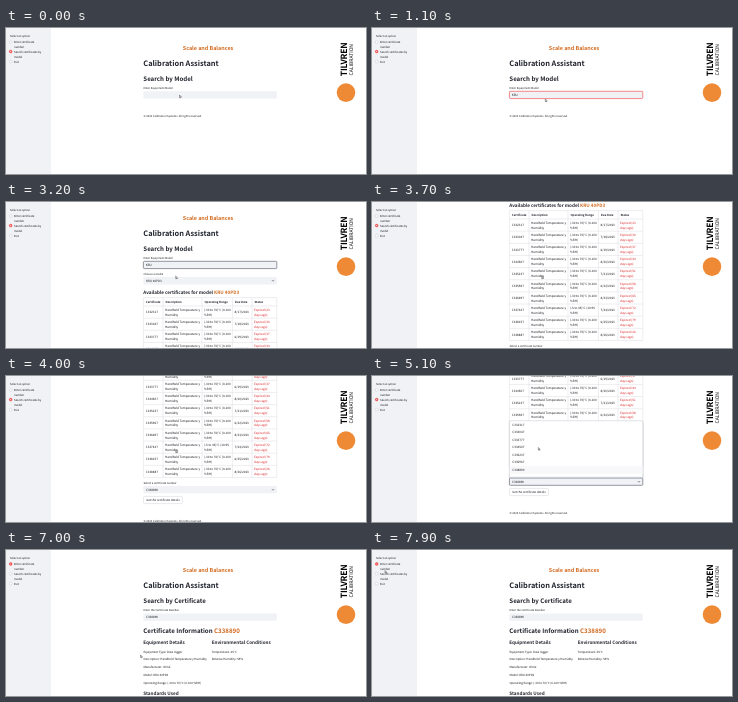
Recreate the animation shown at these times as an HTML page. Size 360 px wide and 146 px high, loop 8 s.

```html
<!DOCTYPE html>
<html lang="en">
<head>
<meta charset="utf-8">
<title>Calibration Assistant</title>
<style>
html, body { margin: 0; width: 100%; height: 100%; overflow: hidden; background: #fff; }
svg { display: block; width: 360px; height: 146px; }
text { font-family: "Noto Sans CJK JP", "Noto Sans CJK SC", "Noto Sans", sans-serif; fill: #14151b; text-rendering: geometricPrecision; white-space: pre; }
text[font-weight] { fill: #22242e; }
</style>
</head>
<body>
<svg id="stage" viewBox="0 0 360 146" xmlns="http://www.w3.org/2000/svg"></svg>
<script>
const LOOP = 8000, STEP = 100;
const H1 = 7.42, H2 = 6.15, H3 = 4.58, BODY = 3.04, SMALL = 2.68;
const ORANGE = '#d2691e', RED = '#f03c3c', GREY = '#f0f2f6', LINE = '#d8dae0', INK = '#14151b';
const MODEL = 'KRU 40PD3', CERT = 'C338890';
const FOOTER = '© 2023 Calibration Systems. All rights reserved.';

// Text placed by the middle of its capitals.
const text = (x, mid, str, size = BODY, attrs = '') =>
  `<text x="${x}" y="${(mid + size * 0.37).toFixed(2)}" font-size="${size}" ${attrs}>${str}</text>`;
const bold = (x, mid, str, size, attrs = '') => text(x, mid, str, size, `font-weight="700" ${attrs}`);
const box = (x, y, w, h, fill, attrs = '') =>
  `<rect x="${x}" y="${y}" width="${w}" height="${h}" fill="${fill}" ${attrs}/>`;
const line = (x1, y1, x2, y2) =>
  `<path d="M${x1} ${y1}L${x2} ${y2}" stroke="${LINE}" stroke-width=".45"/>`;
const group = (id, body) => `<g id="${id}">${body}</g>`;
const accent = str => `<tspan fill="${ORANGE}">${str}</tspan>`;
const field = (id, y) => box(137.4, y, 133.4, 7.3, GREY, `id="${id}" rx="1" stroke-width=".6"`);
const chevron = y => `<path d="M266 ${y - 0.5}l1 1 1-1" fill="none" stroke="${INK}" stroke-width=".5"/>`;

function header(title, label) {
  return bold(202, 19.9, 'Scale and Balances', 5.4, `text-anchor="middle" style="fill:${ORANGE}"`) +
    bold(137.3, 35.6, 'Calibration Assistant', H1) +
    bold(137.3, 50.6, title, H2) +
    text(137.4, 60, label, SMALL);
}

function table() {
  const top = 99.6, first = 108, pitch = 12.15, rows = 10, end = first + rows * pitch;
  const cols = [137.4, 157, 196, 226.4, 246, 270.8];
  const heads = ['Certificate', 'Description', 'Operating Range', 'Due Date', 'Status'];
  let out = cols.map(x => line(x, top, x, end)).join('') + line(137.4, top, 270.8, top);
  heads.forEach((h, i) => out += bold(cols[i] + 2.4, 104, h, 2.85));
  for (let i = 0; i < rows; i++) {
    const y = first + i * pitch, mid = y + pitch / 2, a = mid - 2.4, b = mid + 2.4;
    const red = `style="fill:#d81e22"`;
    out += line(137.4, y, 270.8, y) +
      text(139.8, mid, 'C33' + (2317 + i * 730 % 6573)) +
      text(159, a, 'Handheld Temperature y') + text(159, b, 'Humidity') +
      text(198, a, i === 7 ? '(-5 to 45)°C (10-95' : '(-30 to 70)°C (0-100') + text(198, b, '%RH)') +
      text(228.6, mid, `${8 - i % 3}/${17 + i}/2023`) +
      text(248, a, `Expired (${23 + i * 7 % 60}`, BODY, red) + text(248, b, 'days ago)', BODY, red);
  }
  return out + line(137.4, end, 270.8, end);
}

function results() {
  return text(137.4, 75.6, 'Choose a model', SMALL) +
    box(137.4, 79, 133.4, 7.4, GREY, 'rx="1"') + text(140, 82.7, MODEL) + chevron(82.7) +
    bold(137.3, 94.4, 'Available certificates for model ' + accent(MODEL), H3) +
    table() +
    text(137.4, 235, 'Select a certificate number', SMALL) +
    field('pick', 238) + text(140, 241.7, CERT) + chevron(241.7) +
    box(137.5, 248.4, 39, 7.2, '#fff', 'id="button" rx="1" stroke-width=".5"') +
    text(140.3, 252, 'Get the certificate details', 2.9, 'id="action"') +
    text(137.4, 273.5, FOOTER, SMALL);
}

function certificate() {
  const left = ['Equipment Type: Data logger', 'Description: Handheld Temperature y Humidity',
    'Manufacturer: Olme', 'Model: ' + MODEL, 'Operating Range: (-30 to 70)°C (0-100 %RH)'];
  const right = ['Temperature: 25°C', 'Relative Humidity: 55%'];
  const list = (x, items) => items.map((s, i) => text(x, 101.6 + i * 7.8, s, 2.9)).join('');
  return header('Search by Certificate', 'Enter the Certificate Number') +
    box(137.4, 63.5, 133.4, 7.3, GREY, 'rx="1"') + text(140, 67.2, CERT) +
    bold(137.3, 81, 'Certificate Information ' + accent(CERT), H2) +
    bold(137.3, 92.8, 'Equipment Details', H3) + bold(205.7, 92.8, 'Environmental Conditions', H3) +
    list(137.4, left) + list(205.8, right) +
    bold(137.3, 143.2, 'Standards Used', H3);
}

function menu() {
  let out = box(136.9, 45.3, 134.6, 56.8, '#9aa0ab', 'rx="1" opacity=".4"') +
    box(137.4, 44.8, 133.4, 56.4, '#fff', 'rx="1" stroke="#c0c3ca" stroke-width=".4"') +
    box(137.6, 90.2, 133, 7.5, '#f8f8fa');
  for (let i = 0; i < 7; i++)
    out += text(140.3, 48.6 + i * 7.55, i === 6 ? CERT : 'C33' + (2317 + i * 730 % 6573));
  return out;
}

function sidebar() {
  const labels = [['Enter certificate', 14], ['number', 18.8], ['Search certificates by', 23.8], ['model', 28.6], ['Exit', 33.6]];
  return box(0, 0, 45, 146, GREY) + text(4, 8.4, 'Select an option', SMALL) +
    [14, 23.6, 33.6].map((y, i) => `<circle id="radio${i}" cx="4.7" cy="${y}" r="1.4" stroke-width=".4"/><circle id="dot${i}" cx="4.7" cy="${y}" r=".55" fill="#fff"/>`).join('') +
    labels.map(([s, y]) => text(8, y, s, 2.75)).join('');
}

const brand =
  `<text transform="translate(340.8 48.2) rotate(-90)" font-size="8.6" font-weight="900" letter-spacing="-.25" style="fill:#000">TILVREN</text>` +
  `<text transform="translate(346.8 47.4) rotate(-90)" font-size="5" style="fill:#111">CALIBRATION</text>` +
  `<circle cx="340" cy="64.6" r="9.3" fill="#ee8a35"/>`;

const stage = document.getElementById('stage');
stage.innerHTML = box(0, 0, 360, 146, '#fff') +
  group('search', header('Search by Model', 'Enter Equipment Model') +
    field('input', 63.3) + text(139.7, 67.1, '', BODY, 'id="typed"') +
    group('empty', text(137.4, 88.4, FOOTER, SMALL)) +
    group('results', results())) +
  group('menu', menu()) + group('details', certificate()) + sidebar() + brand +
  `<path id="mouse" d="M0 0V2.6L.7 2 1.1 2.9 1.5 2.7 1.1 1.9H1.9Z" fill="#fff" stroke="#222" stroke-width=".4"/>`;

const $ = id => document.getElementById(id);
const show = (id, on) => $(id).setAttribute('display', on ? 'inline' : 'none');
const paint = (id, stroke) => $(id).setAttribute('stroke', stroke);

// Linear track over [time, value] points.
function track(points, t) {
  let i = 0;
  while (i < points.length - 1 && points[i + 1][0] <= t) i++;
  const [t0, a] = points[i], [t1, b] = points[Math.min(i + 1, points.length - 1)];
  const k = t1 > t0 ? Math.min(1, Math.max(0, (t - t0) / (t1 - t0))) : 0;
  return a + (b - a) * k;
}

const scrollPath = [[3100, 0], [3200, 4], [3700, 91], [4000, 128], [4100, 136]];
const mousePath = [[0, 173.5, 67], [400, 173.5, 67], [900, 173.3, 71], [2000, 173.3, 71], [2700, 169.7, 74],
  [4000, 169.7, 74], [4500, 169, 104], [4700, 169, 104], [4900, 166.3, 71.5], [5200, 166.3, 71.5],
  [5700, 160, 93], [5900, 160, 93], [6300, 154.8, 119], [6900, 154.8, 119], [7600, 13, 20.5]];
const mouseX = mousePath.map(p => [p[0], p[1]]), mouseY = mousePath.map(p => [p[0], p[2]]);

function draw(time) {
  const t = Math.floor(time % LOOP / STEP) * STEP;
  const found = t >= 1200, detail = t >= 6600, hover = t >= 6200;
  const picked = detail ? 0 : 1;

  show('search', !detail);
  show('details', detail);
  show('empty', !found);
  show('results', found);
  show('menu', t >= 4700 && t < 5900);
  $('search').setAttribute('transform', `translate(0 ${-track(scrollPath, t)})`);

  $('typed').textContent = MODEL.slice(0, Math.max(0, Math.min(3, (t - 400) / STEP)));
  paint('input', t < 300 ? 'none' : t < 2900 ? RED : '#4d5162');
  paint('pick', t >= 4700 && t < 5900 ? '#4d5162' : 'none');
  paint('button', hover ? RED : '#d0d2d9');
  $('action').style.fill = hover ? '#d81e22' : INK;

  for (let i = 0; i < 3; i++) {
    const on = i === picked, radio = $('radio' + i);
    radio.setAttribute('fill', on ? RED : '#fff');
    radio.setAttribute('stroke', on ? RED : '#b9bdc8');
    show('dot' + i, on);
  }
  $('mouse').setAttribute('transform', `translate(${track(mouseX, t)} ${track(mouseY, t)})`);
}

const start = performance.now();
function tick() {
  draw(performance.now() - start);
  requestAnimationFrame(tick);
}
tick();
</script>
</body>
</html>
```
